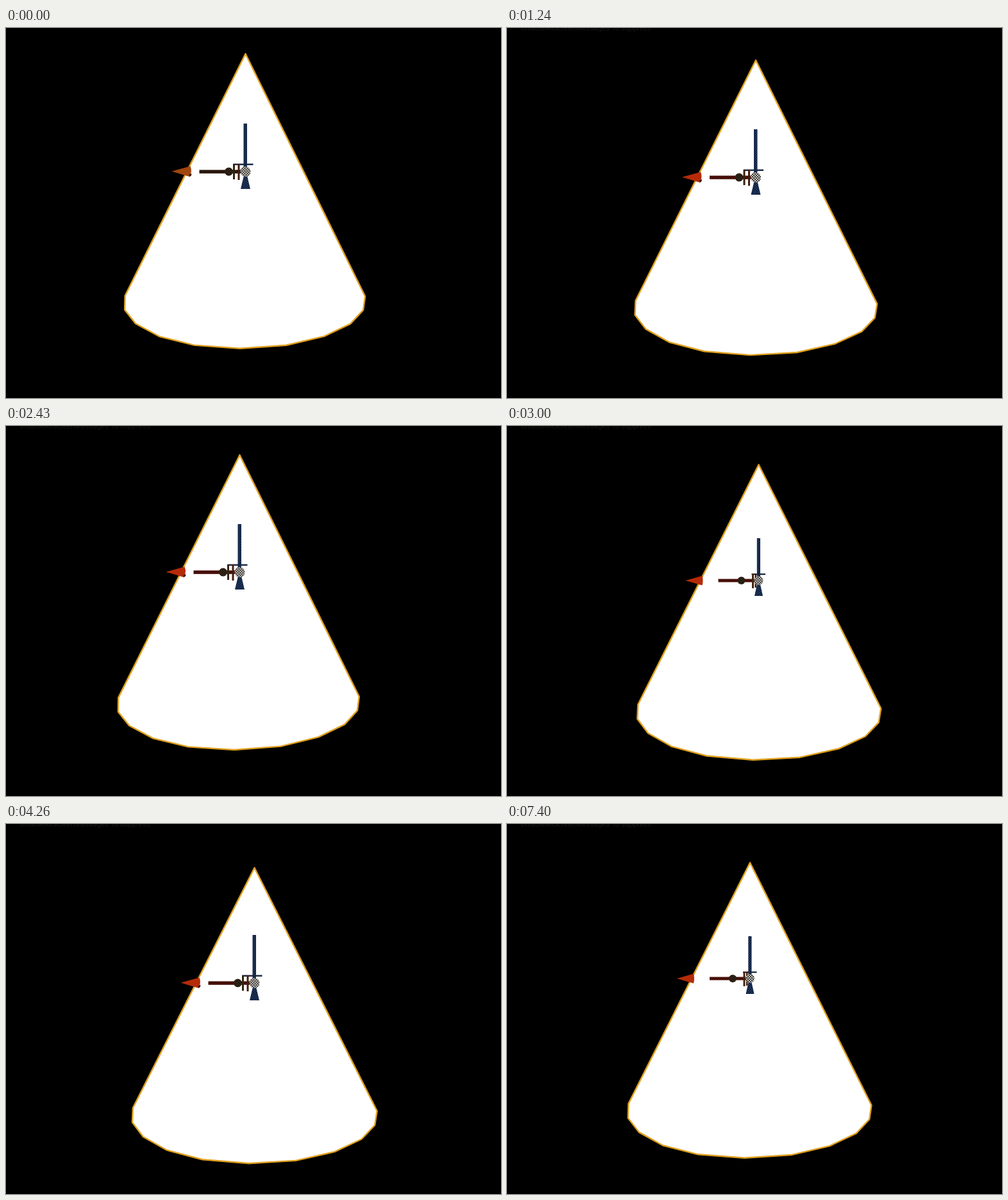
An HTML page for the animation above (7670 ms loop, 772 by 577 pixels).

```html
<!DOCTYPE html>
<html lang="en">
<head>
<meta charset="utf-8">
<title>Shaking cone</title>
<style>
  html, body { margin: 0; width: 100%; height: 100%; overflow: hidden; background: #000; }
  svg { display: block; width: 100vw; height: 100vh; }
  #cone { fill: #fff; stroke: #dfa01f; stroke-width: 2.4; stroke-linejoin: round; }
  #note { font: 11.5px Roboto, Arial, sans-serif; fill: #151515; text-anchor: end; }
  #gizmo { --head: #b52b08; --red: url(#redCheck); }
  #gizmo.warm { --head: #a0470d; --red: url(#brownCheck); }
  .head { fill: var(--head); }
  .red { fill: var(--red); }
  .blue { fill: url(#blueCheck); }
  .ball { fill: url(#greyCheck); }
  .knob { fill: url(#darkCheck); }
</style>
</head>
<body>
<svg viewBox="0 0 772 577">
  <defs id="defs"></defs>
  <text id="note" x="225" y="4">'DisableAllScreenMessages' to suppress</text>
  <polygon id="cone"/>
  <g id="gizmo">
    <g id="long">
      <rect class="blue" x="-3" y="-75" width="5.5" height="70"/>
      <rect x="-19" y="-12.5" width="31" height="2.4" fill="#18263f"/>
      <path class="blue" d="M-2.5 6H2.5L7.5 27H-7.5Z"/>
      <rect class="red" x="-72" y="-2.7" width="68" height="5.5"/>
      <rect x="-19.5" y="-12" width="3" height="24" fill="#33240f"/>
      <rect x="-12" y="-12" width="3" height="25" fill="#451c10"/>
      <circle class="knob" cx="-26" r="6.5"/>
      <circle class="ball" r="8"/>
      <path class="head" d="M-115 -.5L-86 -8.5Q-82.500 -1 -87 8Z"/>
      <path d="M-88 4.500L-84 3L-84.500 6L-87 8Z" fill="#3a1004"/>
    </g>
    <g id="short">
      <rect class="blue" x="-2.7" y="-66" width="5.2" height="61"/>
      <rect x="-11" y="-11" width="21.500" height="2.200" fill="#18263f"/>
      <path class="blue" d="M-2.500 6H2.500L6.500 24H-6.500Z"/>
      <rect class="red" x="-63" y="-2.500" width="58" height="5"/>
      <rect x="-10.500" y="-11" width="3" height="23" fill="#45260f"/>
      <rect x="-6" y="-11" width="2.500" height="22" fill="#451c10"/>
      <circle class="knob" cx="-27" r="6"/>
      <circle class="ball" r="7"/>
      <path class="head" d="M-114 0L-88 -7.500Q-86 0 -88 7.500Z"/>
    </g>
  </g>
  <path id="cross" d="M380 323H404M392 311V335" stroke="#000" stroke-width="2"/>
  <path id="pointer" d="M0 0V14.500L3.300 11.500L6 17L8 16L5.500 10.500H10Z" fill="#fff"/>
</svg>
<script>
const $ = id => document.getElementById(id);
const LOOP = 7670;

// start time, apex x, top edge
const poses = [
  [0, 373.5, 39], [270, 386.5, 45], [700, 373.5, 43], [970, null, 0],
  [1240, 388, 49], [1510, 371, 57], [1910, 365, 52.5], [2180, 360, 48],
  [2430, 364.5, 44], [2700, 378.5, 44], [3000, 392.5, 59], [3240, 390.5, 68.5],
  [3480, 377, 64.5], [3750, 368.5, 60], [3990, 378, 62], [4260, 387.5, 67],
  [4660, 376.5, 62.5], [4930, 365, 58], [5200, 379, 59]
];

// base rim relative to the apex, left to right
const rim = [
  [-188, 0], [-188.5, 22], [-171.5, 43.5], [-134.5, 63.5], [-80, 77], [-8.5, 82],
  [63.5, 77], [122.5, 63], [163.5, 43.5], [183.5, 22], [186.5, 0.5]
];

const checks = {
  red: ['#651409', '#260805'], brown: ['#38200f', '#170c06'], blue: ['#203a68', '#101b30'],
  grey: ['#c8c4ba', '#3b3a3a'], dark: ['#3a2a1a', '#1a130c']
};
$('defs').innerHTML = Object.entries(checks).map(([name, [a, b]]) =>
  `<pattern id="${name}Check" width="4" height="4" patternUnits="userSpaceOnUse">
    <rect width="4" height="4" fill="${a}"/><path d="M0 0h2v4h2v-2h-4z" fill="${b}"/>
  </pattern>`).join('');

const show = (id, on) => $(id).setAttribute('visibility', on ? 'visible' : 'hidden');
const move = (id, x, y) => $(id).setAttribute('transform', `translate(${x} ${y})`);

// slight perspective: the base widens lower down and tilts toward the sides
function conePoints(x, top) {
  const y = top + 1.2, drop = top - 39, side = x - 372;
  const base = rim.map(([px, py]) => [
    x + px * (1 + drop * 0.0006) + side * 0.1 * (1 - py / 82),
    y + 377.5 - drop * 0.03 + py * (1 + drop * 0.00106) + px * side * 0.00074
  ]);
  return [[x, y], ...base].map(p => p.map(v => v.toFixed(2)).join()).join(' ');
}

function draw(t) {
  const [start, x, top] = poses.findLast(p => p[0] <= t);
  const seen = x !== null;
  const short = start === 3000 || start === 5200;
  show('cone', seen);
  show('long', seen && !short);
  show('short', seen && short);
  if (seen) {
    $('cone').setAttribute('points', conePoints(x, top));
    move('gizmo', x, Math.round(224 + (top - 39) * 0.86));
  }
  $('gizmo').classList.toggle('warm', t < 270);
  show('note', t >= 270);
  show('cross', t >= 5500 && t < 6860);
  show('pointer', t >= 6860 && t < 7400);
  move('pointer', ...(t < 7130 ? [710, 466] : [749, 548]));
}

const began = performance.now();
function tick(now) {
  draw(Math.max(0, now - began) % LOOP);
  requestAnimationFrame(tick);
}
draw(0);
requestAnimationFrame(tick);
</script>
</body>
</html>
```
